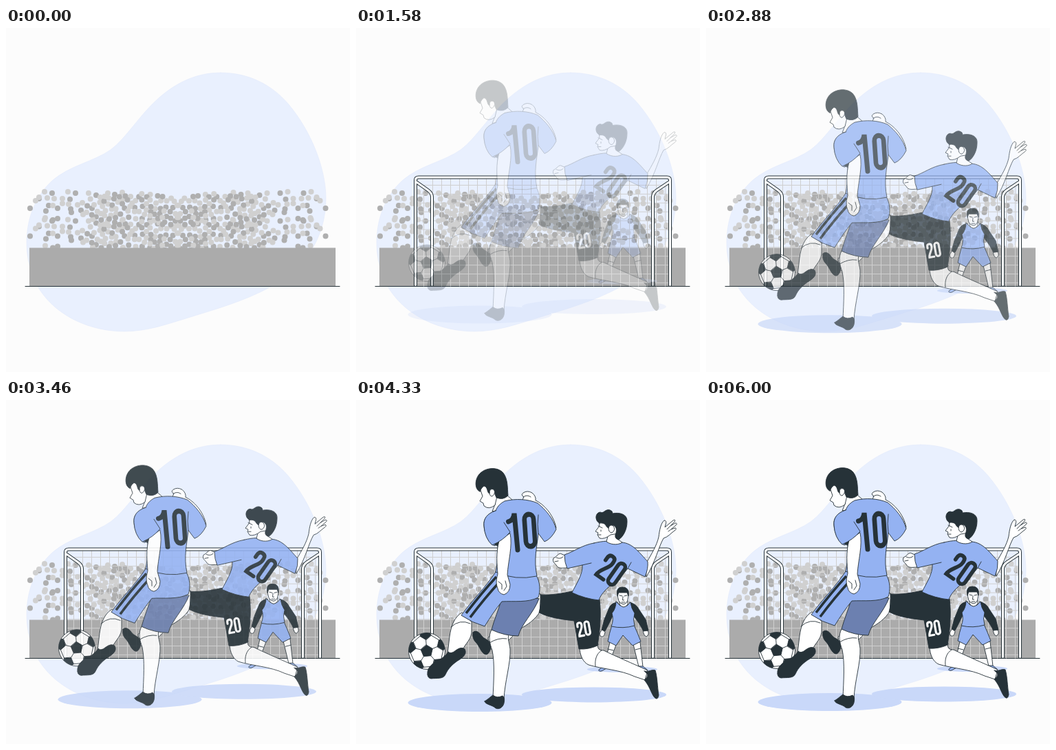
Animation of 500x500 px, one loop 6.04 s. Source, as an HTML page:

```html
<!DOCTYPE html>
<html lang="en">
<head>
<meta charset="utf-8">
<title>Football match</title>
<style>
  html, body { margin: 0; width: 100%; height: 100%; overflow: hidden; background: #fcfcfc; }
  svg { display: block; width: 100vw; height: 100vh; }
  path, ellipse, circle { stroke-linecap: round; stroke-linejoin: round; }
  .w { fill: #fff; stroke: #263238; }
  .b { fill: #94b2f2; stroke: #263238; }
  .k { fill: #263238; stroke: #263238; }
  .l { fill: none; stroke: #263238; }
  .w, .b, .k, .l { stroke-width: .9; }
  .shaded { fill: #6c80b0; }
  .shade { fill: #c9d8f9; }
  .tubes { fill: none; stroke: #263238; stroke-width: 5; }
  .tubes.inner { stroke: #fff; stroke-width: 3; }
  .digit { fill: none; stroke-width: 7; stroke-linejoin: miter; }
  .dark { stroke: #263238; }
  .light { stroke: #fff; }
</style>
</head>
<body>
<svg viewBox="0 0 500 500">
  <defs>
    <path id="two" class="digit" d="M0 13V8Q0 0 7 0Q14 0 14 8V11C14 22 1 31 1 44H17"/>
    <rect id="zero" class="digit" width="14" height="44" rx="7"/>
    <g id="twenty"><use href="#two" x="-19" y="-22"/><use href="#zero" x="5" y="-22"/></g>
    <clipPath id="ballClip"><circle cx="103" cy="364" r="26.500"/></clipPath>
    <path id="frame" d="M86.500 373.500V221Q86.500 217 91 217H452Q456.500 217 456.500 221V373.500
      M88 224L105 236Q110.500 240 110.500 246V373.500M455 224L437 236Q431.500 240 431.500 246V373.500"/>
  </defs>

  <path fill="#e9f0fe" stroke="#dfe7fb" stroke-width=".5" d="M312 65C352 65 386 82 410 110C444 150 465 205 465 247C465 308 432 351 385 376
    C345 398 300 410 262 422C232 431 205 441 172 441C125 441 75 421 48 379C35 358 30 333 30 312
    C30 278 42 245 67 222C92 200 128 194 152 177C175 160 194 126 224 100C250 78 278 65 312 65Z"/>
  <g id="crowd"></g>
  <path fill="#ababab" d="M34 319.500H479V375H34Z"/>
  <path stroke="#263238" d="M28 375.500H485"/>

  <g id="goal">
    <path id="net" fill="none" stroke="#cfcfcf"/>
    <use href="#frame" class="tubes"/>
    <use href="#frame" class="tubes inner"/>
  </g>

  <g id="players">
    <g class="shade">
      <ellipse cx="180" cy="439" rx="104.500" ry="13"/>
      <ellipse cx="346" cy="427.500" rx="105" ry="11"/>
      <ellipse cx="387" cy="390.500" rx="51" ry="4.500"/>
    </g>

    <!-- goalkeeper -->
    <path class="w" d="M369 351L361 386L366 387L378 355ZM403 354L411 387L417 387L413 351Z"/>
    <path class="l" d="M366 361L374 363M406 362L414 360"/>
    <path class="b" d="M362 385L353 391Q352 394 357 393L366 388ZM411 386L417 386L423 391Q425 394 419 393L411 389Z"/>
    <path class="w" d="M358 333Q353 337 355 342Q360 346 362 337ZM417 333L424 334Q427 340 422 343Q418 342 417 333Z"/>
    <path class="k" d="M380 293Q371 294 368 301L361 318L357 333L362 335Q368 324 372 315L377 306ZM398 293Q408 296 411 303L421 318L425 334L418 335Q411 322 405 315L400 306Z"/>
    <path class="b" d="M372 326Q368 339 366 350L378 356L388 341L402 356L414 350Q409 337 404 326Z"/>
    <path class="b" d="M378 292Q378 302 372 309Q375 319 371 328Q388 332 405 327Q402 318 405 309Q400 302 399 293Q389 307 378 292Z"/>
    <path class="w" d="M383 291V296Q389 304 395 296V291Z"/>
    <path class="w" d="M380.500 278Q379 295 389 296Q397 295 395.500 278Z"/>
    <path class="k" d="M380 284Q377 271 387 271Q398 271 396 284L394 279H382Z"/>
    <path class="l" d="M383 283L387 284M390 284L394 283M388 285L387.500 290H389.500M386 293H391"/>

    <!-- number 20 -->
    <path class="w" d="M268 281C250 277 228 290 219 306L214 330C207 337 200 341 192 344L194 361C212 361 226 344 238 332C249 326 261 318 267 307Z"/>
    <path class="k" d="M170 337C173 333 179 336 182 341C186 347 193 347 196 353C197 361 193 369 189 369C182 368 180 357 174 351C170 347 169 341 170 337Z"/>
    <path class="w" d="M325 358C325 371 331 381 338 384C357 390 384 391 405 401L420 406L424 392C402 382 376 371 360 363C354 363 350 361 352 354Z"/>
    <path class="l" d="M348 386C347 377 349 368 357 363"/>
    <path class="k" d="M419 393C425 395 430 390 435 392C438 401 438 416 440 428Q439 434 436 433C430 430 428 416 419 406Q424 402 424 398Z"/>
    <path class="k" d="M268 282C285 283 300 280 314 277L354 289C357 312 354 338 351 356Q338 362 324 361L317 320C300 318 282 316 266 308Q270 295 268 282Z"/>
    <path class="w" d="M306 226L299 223C295 220 292 227 287 229C285 235 289 236 291 239C294 245 300 243 307 243Z"/>
    <path class="l" d="M291 228Q297 231 301 227M289 234L294 233"/>
    <path class="w" d="M422 236C430 222 437 211 440 198C441 189 443 178 448 174Q452 174 450 180L449 184L461 174Q465 172 463 176L457 182L464 178Q468 178 465 181L458 187L464 185Q467 186 463 189C457 193 454 198 447 200C440 212 435 235 422 256Z"/>
    <path class="l" d="M457 182L452 187M458 187L454 190"/>
    <path class="b" d="M346 207C328 210 316 220 303 224Q303 235 307 244L329 239C330 253 319 268 314 279Q333 288 353 290C359 273 379 264 395 244L420 256Q425 244 424 234C412 221 402 207 386 206C370 203 358 204 346 207Z"/>
    <path class="l" d="M329 239L342 236M395 244L400 235"/>
    <path class="w" d="M367 193L364 205C373 211 383 209 387 206L378 200V191Z"/>
    <path class="w" d="M353 175L354 182L348 190L352 192L351 195L354 200Q361 202 370 195L382 193L381 177Z"/>
    <path class="l" d="M352 182L358 185M356 188V190M352 195H356"/>
    <path class="k" d="M354 178C347 175 347 163 355 162C360 165 362 157 369 159Q373 160 373 164C383 162 395 165 394 176C394 188 388 198 382 202C376 201 376 196 378 192Q380 184 374 181C370 182 370 187 367 185C362 184 365 177 354 178Z"/>
    <path class="w" d="M367 185Q369 179 374 182Q378 188 372 192Q367 192 367 185Z"/>
    <use href="#twenty" class="dark" transform="translate(371 246.500) rotate(35) scale(.8)"/>
    <use href="#twenty" class="light" transform="translate(331 331.500) rotate(-10) scale(.44)"/>

    <!-- ball -->
    <circle class="w" cx="103" cy="364" r="26.500"/>
    <g clip-path="url(#ballClip)">
      <path id="patches" class="k"/>
      <path id="seams" class="l"/>
    </g>

    <!-- number 10 -->
    <path class="w" d="M197 333C192 342 194 352 198 363C202 382 200 409 199 432L215 434C216 409 225 382 224 361C223 352 220 347 222 339Z"/>
    <path class="l" d="M194 352Q207 344 219 346"/>
    <path class="k" d="M187 437C192 434 196 430 199 428Q205 433 213 429Q217 431 215 440C213 447 207 449 203 447C198 442 188 442 187 437Z"/>
    <path class="w" d="M154 308C143 314 138 328 136 343L133 368L154 364C159 352 169 347 168 333L168 322Z"/>
    <path class="l" d="M138 329Q151 317 166 324"/>
    <path class="k" d="M104 398C103 390 108 384 117 379C125 375 130 371 134 365Q138 369 145 363Q153 357 158 361C161 367 158 371 151 376C141 382 134 389 130 398C127 405 118 403 109 404Q104 403 104 398Z"/>
    <path class="b shaded" d="M212 288C207 304 201 318 197 333Q216 342 236 342C240 325 258 309 266 288Z"/>
    <path class="b" d="M203 249L262 254C268 264 268 277 265 286C250 294 229 291 212 292C203 303 195 315 187 328Q169 323 153 312C168 291 188 272 203 249Z"/>
    <path d="M204 256Q182 280 160 309M210 262Q186 288 166 315" fill="none" stroke="#263238" stroke-width="3.600" style="stroke-linecap:butt"/>
    <path class="w" d="M241 146L244 140Q239 137 243 134Q249 130 256 134Q262 139 261 145C272 150 287 165 291 185L283 191L260 150Z"/>
    <path class="l" d="M243 140Q249 136 254 140"/>
    <path class="w" d="M203 136L202 151L198 161Q214 160 228 145L220 138Z"/>
    <path class="b" d="M203 160C206 152 211 149 216 146C232 142 250 143 264 149C275 158 287 171 291 187Q284 201 274 205L265 193C263 213 258 231 263 255Q232 262 203 249C207 231 204 218 207 208L201 211C190 205 185 187 186 177C187 168 196 163 203 160Z"/>
    <path class="k" d="M200 208L209 199L206 211Z"/>
    <path class="l" d="M265 193Q263 180 265 166M209 197Q213 188 211 180"/>
    <path class="w" d="M208 204C203 221 205 239 206 252C203 263 204 268 206 273Q207 280 215 282Q224 279 224 267L220 253C221 234 228 211 224 193Z"/>
    <path class="l" d="M207 263L212 267V274M217 262L219 270L215 276"/>
    <path class="b" d="M203 160C190 164 185 172 186 182Q187 200 198 210Q214 203 224 191L215 177"/>
    <path class="w" d="M181 130L184 139L180 146L185 149L186 153Q193 159 202 152L205 139L205 125L187 121Z"/>
    <path class="k" d="M180 132C172 129 172 113 181 105C190 97 206 96 214 105C221 114 220 127 221 138Q214 145 204 141L202 136C202 130 199 128 196 130L194 135C190 134 192 125 186 124Q182 126 180 132Z"/>
    <path class="w" d="M194 134Q194 127 200 129Q204 134 198 139Q194 139 194 134Z"/>
    <path class="digit dark" d="M221.500 176Q229 174 230 164L235 217"/>
    <use href="#zero" class="dark" transform="translate(252.500 188.500) rotate(-4) scale(.95 1.060) translate(-7 -22)"/>
  </g>
</svg>
<script>
  const $ = id => document.getElementById(id);
  const range = n => [...Array(n).keys()];

  // One quarter of the crowd: sparse at the side, then random and denser
  // towards the middle. It is mirrored across the middle and stacked twice.
  const dark = [[35,262],[48,248],[67,240],[58,266],[75,262],[68,279],[75,277],[62,258],[101,240],[94,263],
    [95,268],[93,249],[109,265],[131,243],[158,242],[125,262]];
  const light = [[43,251],[56,238],[60,247],[70,248],[68,258],[48,246],[57,276],[82,248],[82,255],[90,238],
    [91,256],[104,257],[111,254],[112,271],[120,240],[137,246],[148,240],[169,239],[128,257],[117,268]];
  const dots = [...dark, ...light];
  let seed = 11;
  const random = () => (seed = seed * 16807 % 2147483647) / 2147483647;
  for (let i = 0; i < 3000 && dots.length < 122; i++) {
    const x = 118 + 132 * random() ** .75;
    const top = 241 + Math.max(0, x - 205) / 6;
    const dot = [x, top + 39 * random()];
    if (dots.some(d => Math.hypot(d[0] - dot[0], d[1] - dot[1]) < 5.8)) continue;
    dots.push(dot);
    if (random() < .5) dark.push(dot);
  }
  $('crowd').innerHTML = dots.map(dot => {
    const [x, y] = dot;
    const fill = dark.includes(dot) ? '#afafaf' : '#d0d0d0';
    return [x, 499.500 - x].map(cx => [y, y + 40.500].map(cy =>
      `<circle cx="${cx}" cy="${cy}" r="4" fill="${fill}"/>`).join('')).join('');
  }).join('');

  $('net').setAttribute('d',
    range(28).map(i => `M${98.500 + 13 * i} ${i % 27 ? 219 : 230}V375`).join('') +
    range(12).map(i => `M88 ${228.500 + 12.900 * i}H455`).join(''));

  // Ball: a middle pentagon and five around it, joined corner to corner.
  const polar = (x, y, r, deg) => [x + r * Math.cos(deg * Math.PI / 180), y + r * Math.sin(deg * Math.PI / 180)];
  const pentagon = (x, y, r, turn) => range(5).map(i => polar(x, y, r, turn + 72 * i));
  const middle = pentagon(103, 364, 9, -95);
  const outer = range(5).map(i => -95 + 72 * i).map(a => pentagon(...polar(103, 364, 25, a), 8.500, a + 180));
  $('patches').setAttribute('d', [middle, ...outer].map(p => `M${p.join('L')}Z`).join(''));
  $('seams').setAttribute('d', outer.map((p, i) =>
    `M${middle[i]}L${p[0]}M${p[4]}L${outer[(i + 1) % 5][1]}`).join(''));

  // cubic-bezier(.36, -.01, .5, 1.38)
  const curve = (a, b, s) => 3 * a * s * (1 - s) ** 2 + 3 * b * s * s * (1 - s) + s ** 3;
  function ease(x) {
    if (x >= 1) return 1;
    let lo = 0, hi = 1;
    for (let i = 0; i < 24; i++) {
      const mid = (lo + hi) / 2;
      if (curve(.36, .5, mid) < x) lo = mid; else hi = mid;
    }
    return curve(-.01, 1.38, lo);
  }

  function slideDown(id, progress) {
    const p = ease(progress);
    $(id).setAttribute('transform', `translate(0 ${30 * (p - 1)})`);
    $(id).setAttribute('opacity', Math.min(1, Math.max(0, p)));
  }

  const start = performance.now();
  function draw() {
    const t = (performance.now() - start) % 6040;
    slideDown('goal', t / 1000);
    slideDown('players', t / 6000);
    requestAnimationFrame(draw);
  }
  draw();
</script>
</body>
</html>
```
